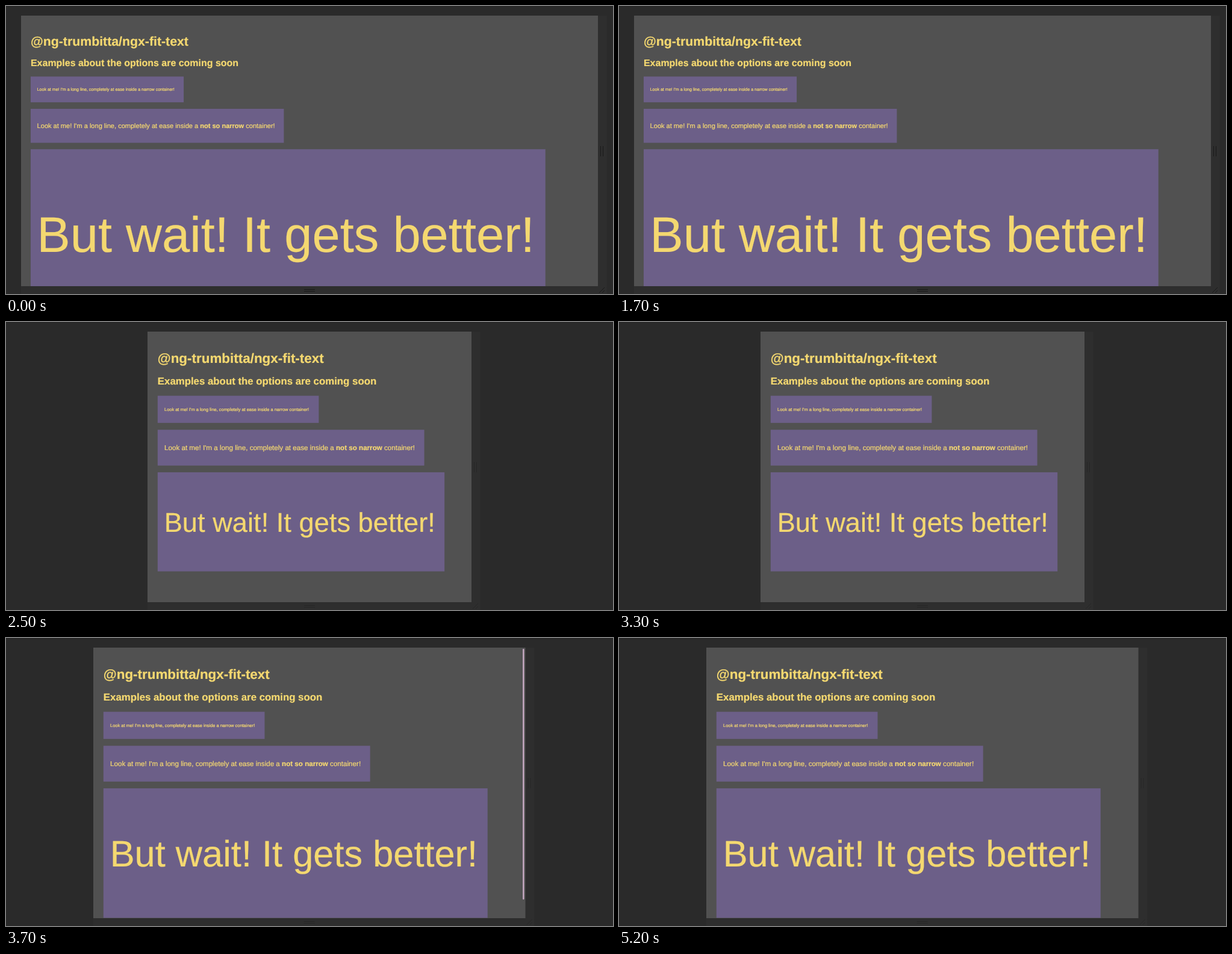
Animation, 1008 px wide and 479 px high, one loop 5.3 s. Source, as an HTML page:

```html
<!DOCTYPE html>
<html lang="en">
<head>
<meta charset="utf-8">
<title>Fit text demo</title>
<style>
  html, body { margin: 0; width: 100%; height: 100%; overflow: hidden; background: #2a2a2a; }
  svg { display: block; width: 100%; height: 100%; }
  text {
    font-family: "Liberation Sans", Arial, Helvetica, sans-serif;
    font-kerning: none;
    text-rendering: geometricPrecision;
    fill: #f4d870;
    stroke: #f4d870;
    stroke-width: 0.35;
  }
  .bold { font-weight: 700; }
  .box { fill: #6c5f88; }
  .grip { fill: none; stroke-width: 1; }
</style>
</head>
<body>
<svg viewBox="0 0 1008 479" preserveAspectRatio="none">
  <defs>
    <clipPath id="clip"><rect id="clipRect" y="16" height="450"/></clipPath>
  </defs>
  <rect width="1008" height="479" fill="#2a2a2a"/>
  <rect width="1008" height="1" fill="#242424"/>
  <rect id="frame" y="16" height="463" fill="#2e2e2e"/>
  <rect id="panel" y="16" height="450" fill="#515151"/>
  <path id="grips" class="grip"/>
  <g clip-path="url(#clip)">
    <g id="page">
      <text class="bold" x="24" y="74.7" font-size="32">@ng-trumbitta/ngx-fit-text</text>
      <text class="bold" x="24" y="125.6" font-size="24">Examples about the options are coming soon</text>
      <rect class="box" x="24" y="152.3" width="382" height="64.4"/>
      <text x="40" y="188.2" font-size="10.64">Look at me! I'm a long line, completely at ease inside a narrow container!</text>
      <rect class="box" x="24" y="233" width="632" height="85"/>
      <text x="40" y="281.6" font-size="16.59">Look at me! I'm a long line, completely at ease inside a <tspan class="bold">not so narrow</tspan> container!</text>
      <rect id="bigBox" class="box" x="24" y="334"/>
      <text id="bigText" x="39.5"></text>
    </g>
    <rect id="thumb" y="18" width="2.4" rx="1.2" fill="#c8aac4"/>
  </g>
</svg>
<script>
const LOOP = 5300;
const STEP = 100;
const TOP = 16;
const PHRASE = ["But wait! It", " gets better!"];
const FIT_RATIO = 10.03; // content width to font size

const el = id => document.getElementById(id);
const set = (id, attrs) => {
  for (const k in attrs) el(id).setAttribute(k, attrs[k]);
};

// Device presets: page width in CSS px, left edge and width on stage.
const desktop = { css: 1440, x: 25, w: 958, grip: "#191919" };
const portrait = { css: 768, x: 235, w: 538, grip: "#262626" };
const landscape = { css: 1024, x: 145, w: 717.5, grip: "#262626" };

const boxWidth = view => 0.9 * (view.css - 48) + 32;
const fitted = view => (boxWidth(view) - 32) / FIT_RATIO;

// Text keeps its old size after a resize until the debounced refit.
const REFIT_DELAY = 100;
const TO_PORTRAIT = 1800;
const TO_LANDSCAPE = 3500;
const scenes = [
  { at: 0, view: desktop, fit: desktop },
  { at: TO_PORTRAIT, view: portrait, fit: desktop, thumb: 301 },
  { at: TO_PORTRAIT + REFIT_DELAY, view: portrait, fit: portrait },
  { at: TO_LANDSCAPE, view: landscape, fit: portrait },
  { at: TO_LANDSCAPE + REFIT_DELAY, view: landscape, fit: landscape, thumb: 417 }
];

// Overlay scrollbar: fully visible for 300 ms, then fades over 250 ms.
function thumbOpacity(scene, t) {
  if (!scene.thumb) return 0;
  return Math.max(0, Math.min(1, 1 - (t - scene.at - 300) / 250));
}

function gripPath(right, mid) {
  const x = right + 4.5;
  return `M${x} 233V250M${x + 4} 233V250` +
    `M${mid - 9} 471.5H${mid + 9}M${mid - 9} 474.5H${mid + 9}` +
    `M${right + 2} 477L${right + 11} 468M${right + 7} 477L${right + 11} 473`;
}

function render(time) {
  const t = Math.floor((time % LOOP) / STEP) * STEP;
  const scene = scenes.filter(s => s.at <= t).pop();
  const { view, fit } = scene;
  const { x, w } = view;
  const size = fitted(fit);
  const overflows = fitted(view) < size;

  set("frame", { x, width: w + 14.5 });
  set("panel", { x, width: w });
  set("clipRect", { x, width: w });
  set("page", { transform: `translate(${x} ${TOP}) scale(${w / view.css})` });
  set("bigBox", { width: boxWidth(view), height: 32 + 3.145 * size });
  set("bigText", { y: 350 + 1.93 * size, "font-size": size });
  el("bigText").textContent = overflows ? PHRASE[0] : PHRASE.join("");
  set("grips", { d: gripPath(x + w, x + w / 2), stroke: view.grip });
  set("thumb", { x: x + w - 4.4, height: scene.thumb || 0, opacity: thumbOpacity(scene, t) });
}

const start = performance.now();
function tick() {
  render(performance.now() - start);
  requestAnimationFrame(tick);
}
tick();
</script>
</body>
</html>
```
